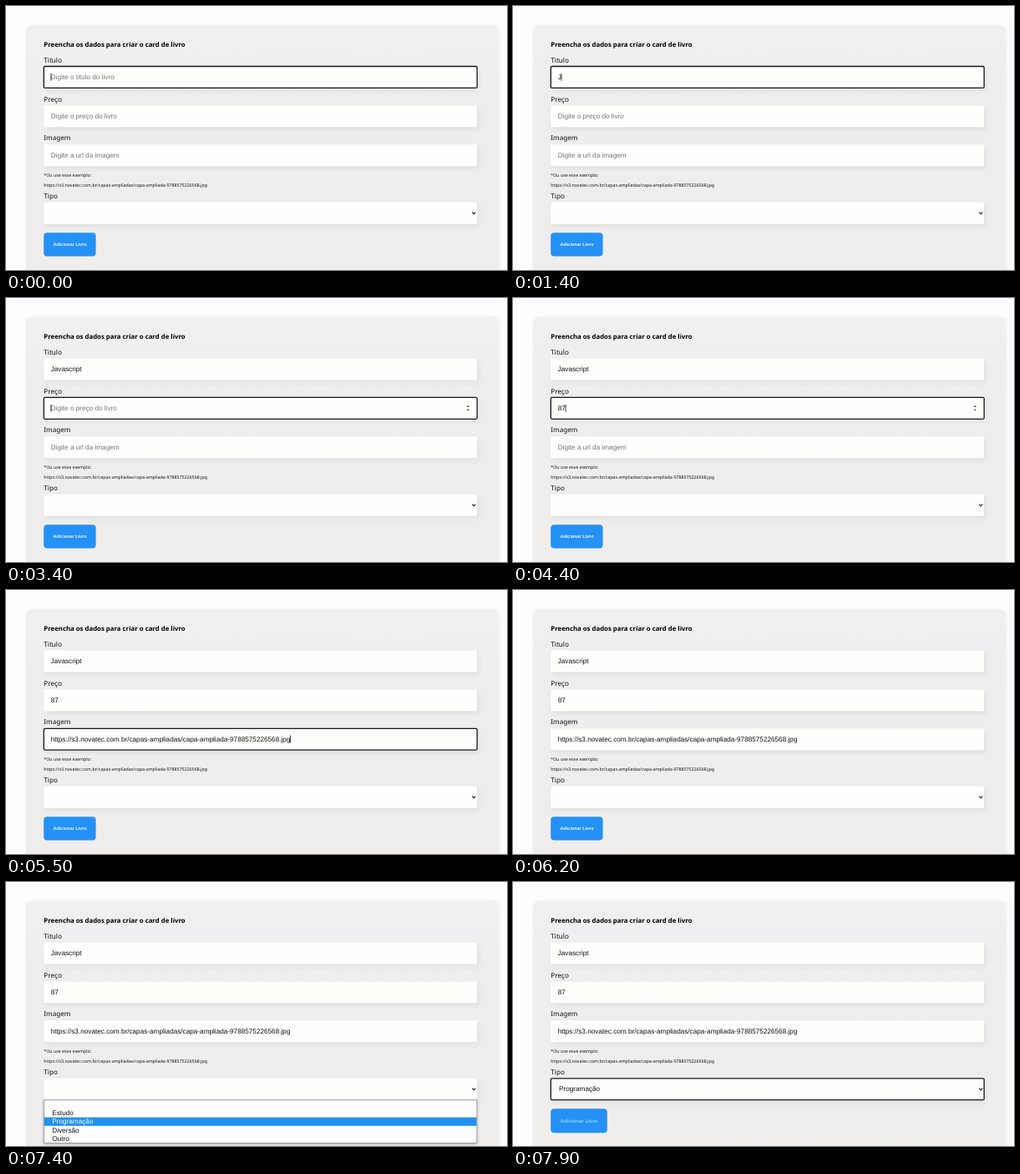
These frames come from a looping animation (600 by 317 pixels, 8000 ms). An HTML page:

```html
<!DOCTYPE html>
<html lang="pt-BR">
<head>
<meta charset="utf-8">
<style>
html, body { margin: 0; height: 100%; overflow: hidden; background: #fdfcfe; }
svg { display: block; width: 600px; height: 317px; text-rendering: geometricPrecision; }
text { font: 8.2px "Liberation Sans", Arial, sans-serif; fill: #111; white-space: pre; }
.label { font: 8.15px "Noto Sans", sans-serif; }
.title { font: bold 7.8px "Noto Sans", sans-serif; fill: #000; }
.note { font: 5.29px "Noto Sans", sans-serif; }
.field { fill: #fefefd; filter: drop-shadow(2px 3px 3px #0000000f); }
.empty { fill: #757575; }
#btnText { font-weight: bold; fill: #f4faff; }
#ring { fill: none; stroke: #16161a; stroke-width: 1.3; }
#caret { fill: #111; }
</style>
</head>
<body>
<svg viewBox="0 0 600 317">
  <defs>
    <linearGradient id="cardFill" x2="0" y2="1">
      <stop offset="0" stop-color="#f0eff2"/>
      <stop offset=".3" stop-color="#efeeee"/>
      <stop offset="1" stop-color="#efeeed"/>
    </linearGradient>
  </defs>
  <rect x="24" y="22.5" width="566" height="320" rx="8" fill="url(#cardFill)" style="filter:drop-shadow(1px 1px 2px #00000010)"/>
  <text class="title" x="45.3" y="49.3">Preencha os dados para criar o card de livro</text>
  <g id="form"></g>
  <text class="note" x="45.3" y="205.2">*Ou use esse exemplo:</text>
  <text class="note" x="45.3" y="216.9">https://s3.novatec.com.br/capas-ampliadas/capa-ampliada-9788575226568.jpg</text>
  <path d="M558.3 247.6l2 2 2-2" fill="none" stroke="#222" stroke-width="1.2"/>
  <path id="spin" d="M551.6 131l1.7-2.2 1.7 2.2zM551.6 133.6l1.7 2.2 1.7-2.2z" fill="#555"/>
  <rect id="btn" x="45.2" y="272.3" rx="4" fill="#2491f6"/>
  <text id="btnText" x="56.6">Adicionar Livro</text>
  <rect id="ring" x="45.3" width="518.9" height="25.9" rx="1.5"/>
  <rect id="caret" width=".8" height="9"/>
  <g id="menu">
    <rect x="45.3" y="261.8" width="518.6" height="51.8" fill="#fefefe" stroke="#8e8e8e" stroke-width=".8" style="filter:drop-shadow(0 1px 1.5px #0004)"/>
    <rect id="mark" x="45.8" width="517.7" height="10.2" fill="#2291ef"/>
  </g>
</svg>
<script>
const $ = id => document.getElementById(id);
const set = (el, attrs) => { for (const k in attrs) el.setAttribute(k, attrs[k]); };
const show = (id, on) => $(id).style.display = on ? '' : 'none';
function add(parent, tag, attrs, text = '') {
  const el = document.createElementNS('http://www.w3.org/2000/svg', tag);
  set(el, attrs);
  el.textContent = text;
  return parent.appendChild(el);
}

const url = 'https://s3.novatec.com.br/capas-ampliadas/capa-ampliada-9788575226568.jpg';
const fields = [
  { label: 'Titulo', y: 72.5, hint: 'Digite o titulo do livro', value: 'Javascript',
    keys: [1400, 1700, 1900, 2000, 2200, 2300, 2500, 2700, 2900, 3000] },
  { label: 'Preço', y: 119.4, hint: 'Digite o preço do livro', value: '87', keys: [4100, 4400] },
  { label: 'Imagem', y: 166.3, hint: 'Digite a url da imagem', value: url, keys: [5500] },
  { label: 'Tipo', y: 235.8, hint: '', value: 'Programação', keys: [7500] }
];
for (const f of fields) {
  add($('form'), 'text', { class: 'label', x: 45.3, y: f.y - 4.9 }, f.label);
  add($('form'), 'rect', { class: 'field', x: 45.3, y: f.y, width: 518.7, height: 25.9, rx: 1 });
  f.text = add($('form'), 'text', { x: f.label === 'Tipo' ? 55 : 53.7, y: f.y + 15.6 });
}

const rowY = i => 262.2 + i * 10.2;
const items = ['', 'Estudo', 'Programação', 'Diversão', 'Outro'].map((name, i) =>
  add($('menu'), 'text', { x: 55.3, y: rowY(i) + 7.8 }, name));

// Index of the focused field, or -1
const focusAt = t => t < 3400 ? 0 : t < 4700 ? 1 : t < 6100 ? 2 : t < 7500 ? -1 : 3;

function draw(t) {
  const focus = focusAt(t);
  for (const f of fields) {
    const n = f.keys.filter(k => k <= t).length;
    const typed = f.keys.length === 1 ? (n ? f.value : '') : f.value.slice(0, n);
    f.text.textContent = typed || f.hint;
    f.text.setAttribute('class', typed ? '' : 'empty');
    f.typed = typed;
  }

  const active = fields[focus];
  show('ring', active);
  if (active) $('ring').setAttribute('y', active.y);
  show('spin', focus === 1);

  // The caret blinks every 600 ms, restarting at each key or focus change
  const starts = [-100, 3400, 4700, ...fields.flatMap(f => f.keys)];
  const since = t - Math.max(...starts.filter(s => s <= t));
  show('caret', focus >= 0 && focus < 3 && since % 1200 < 600);
  if (active) set($('caret'), {
    x: 53.5 + (active.typed ? active.text.getComputedTextLength() : 0),
    y: active.y + 8.3
  });

  const row = t < 6900 ? 0 : 2;
  show('menu', t >= 6400 && t < 7500);
  $('mark').setAttribute('y', rowY(row));
  items.forEach((el, i) => el.style.fill = i === row ? '#fff' : '');

  const hover = t >= 7900;
  set($('btn'), { width: hover ? 67.6 : 62.4, height: hover ? 28.9 : 28.2 });
  set($('btnText'), { y: hover ? 288.9 : 288.4 });
  Object.assign($('btnText').style, { fontSize: hover ? '6.1px' : '5.45px', fill: hover ? '#8fd6f2' : '' });
}

const start = performance.now();
function tick() {
  draw((performance.now() - start) % 8000);
  requestAnimationFrame(tick);
}
tick();
</script>
</body>
</html>
```
